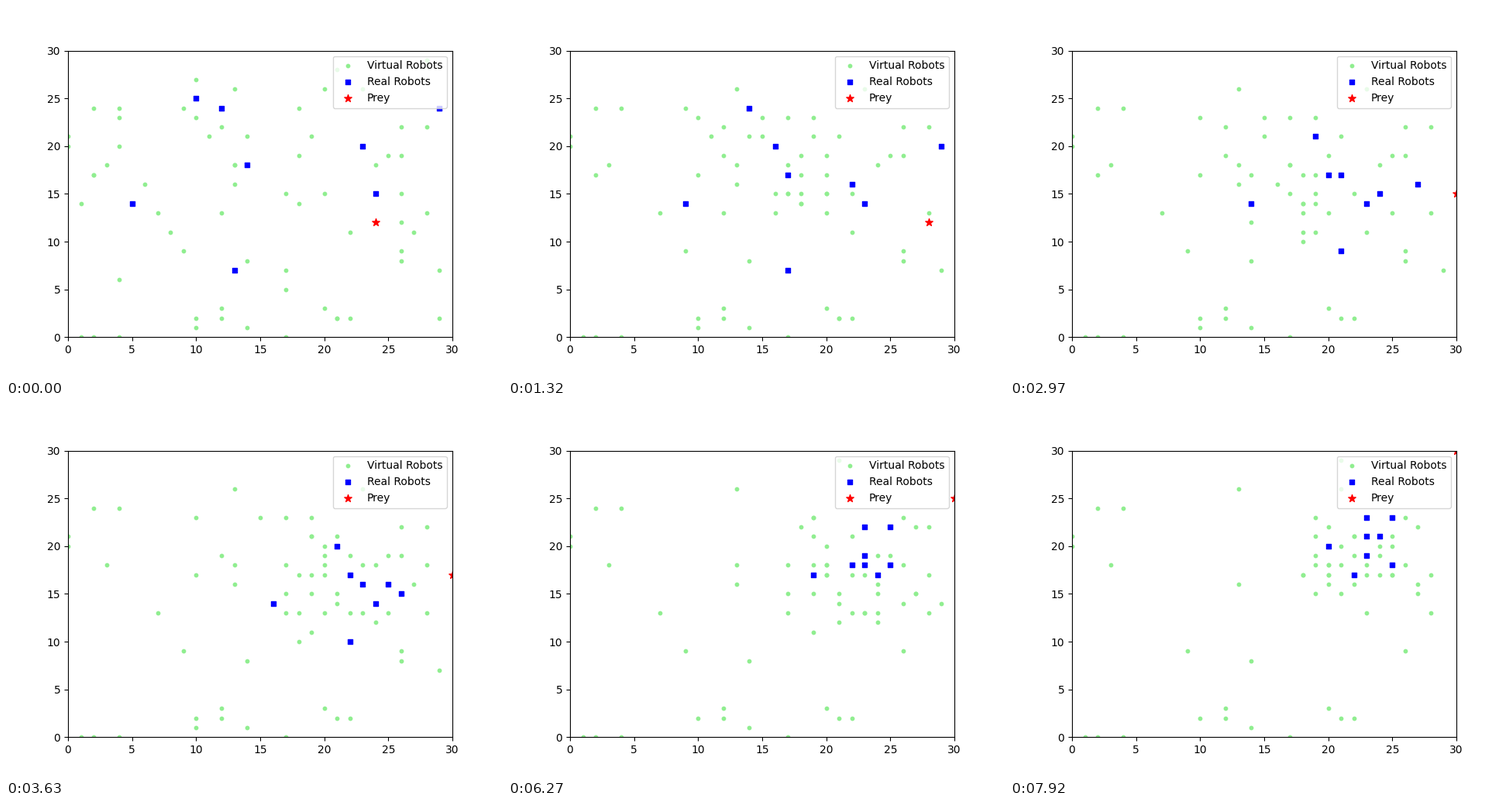
Write a matplotlib script that moves like this. It is 640 px wide and 480 px high and loops after 8 s.

```python
import numpy as np
import matplotlib.pyplot as plt
from matplotlib.animation import FuncAnimation

LOOP, TICK, STEP = 8000, 50, 330
LAST = LOOP // STEP
SIZE = 30

# Virtual robots that never move
FIXED = [(0, 21), (0, 20), (1, 0), (2, 24), (2, 0), (3, 18), (4, 24), (4, 0),
         (9, 9), (10, 2), (12, 3), (12, 2), (13, 26), (13, 16), (14, 8), (14, 1),
         (17, 0), (19, 21), (20, 3), (21, 2), (22, 2), (26, 9), (28, 13)]

# Virtual robots that wait before joining the pack, in order of departure
WAITING = [(4, 6), (2, 17), (12, 22), (18, 19), (4, 20), (14, 21), (17, 15),
           (12, 13), (22, 11), (9, 24), (21, 2), (11, 21), (17, 7), (20, 15),
           (18, 14), (2, 17), (23, 26), (26, 8), (29, 7), (10, 23), (10, 1),
           (24, 18), (26, 22), (26, 19), (28, 22), (25, 19), (13, 18), (7, 13)]
EARLY = 16         # scattered at random, gone after two steps
SPREAD = 3         # how widely robots land around the pack
REHOP = 0.12       # chance per step that a landed robot hops again

# Waypoints of the real robots
KEYS = [0, 6, 11, 15, 19, 24]
TRACKS = [
    [(10, 25), (16, 23), (21, 20), (25, 20), (25, 22), (25, 23)],
    [(12, 24), (18, 18), (23, 16), (23, 17), (23, 19), (23, 21)],
    [(29, 24), (29, 18), (26, 15), (24, 16), (25, 18), (25, 18)],
    [(23, 20), (22, 14), (25, 16), (25, 18), (23, 22), (23, 23)],
    [(14, 18), (18, 16), (22, 17), (21, 17), (22, 18), (22, 17)],
    [(24, 15), (22, 13), (24, 14), (23, 15), (23, 18), (24, 21)],
    [(5, 14), (11, 14), (16, 14), (20, 18), (19, 17), (20, 20)],
    [(13, 7), (19, 7), (22, 10), (23, 14), (24, 17), (23, 19)],
]


def real_at(k):
    """Walk straight between waypoints, on whole cells."""
    pos = [[np.interp(k, KEYS, axis) for axis in zip(*track)] for track in TRACKS]
    return np.ceil(np.array(pos) - 0.5)


def prey_at(k):
    """Run right to the wall, then up along it."""
    return [(min(24 + k, SIZE), 12 + max(0, k - 6))]


def virtual_states():
    """Robots leave their places, fast at first, and land around the pack."""
    rng = np.random.default_rng(4)
    roam = np.vstack([rng.integers(0, SIZE, (EARLY, 2)), WAITING]).astype(float)
    index = np.arange(len(roam))
    states, gone = [], 0
    for k in range(LAST + 1):
        left = round(len(roam) * (k / LAST) ** 0.4)
        again = (index < gone) & (rng.random(len(roam)) < REHOP)
        hop = again | ((index >= gone) & (index < left))
        landing = rng.normal(real_at(k).mean(axis=0), SPREAD, roam.shape)
        roam[hop] = landing.round().clip(0, SIZE)[hop]
        gone = left
        states.append(np.vstack([FIXED, roam]))
    return states


VIRTUAL = virtual_states()

fig, ax = plt.subplots(figsize=(6.4, 4.8), dpi=100)
ax.set_xlim(0, SIZE)
ax.set_ylim(0, SIZE)
virtual = ax.scatter([], [], s=10, color="lightgreen", marker="o", label="Virtual Robots")
real = ax.scatter([], [], s=20, color="blue", marker="s", label="Real Robots")
prey = ax.scatter([], [], s=50, color="red", marker="*", label="Prey")
ax.legend(loc="upper right")


def update(i):
    k = (i * TICK + TICK - 1) // STEP
    virtual.set_offsets(VIRTUAL[k])
    real.set_offsets(real_at(k))
    prey.set_offsets(prey_at(k))
    return virtual, real, prey


anim = FuncAnimation(fig, update, frames=LOOP // TICK, interval=TICK,
                     repeat=True, repeat_delay=0)
plt.show()
```
